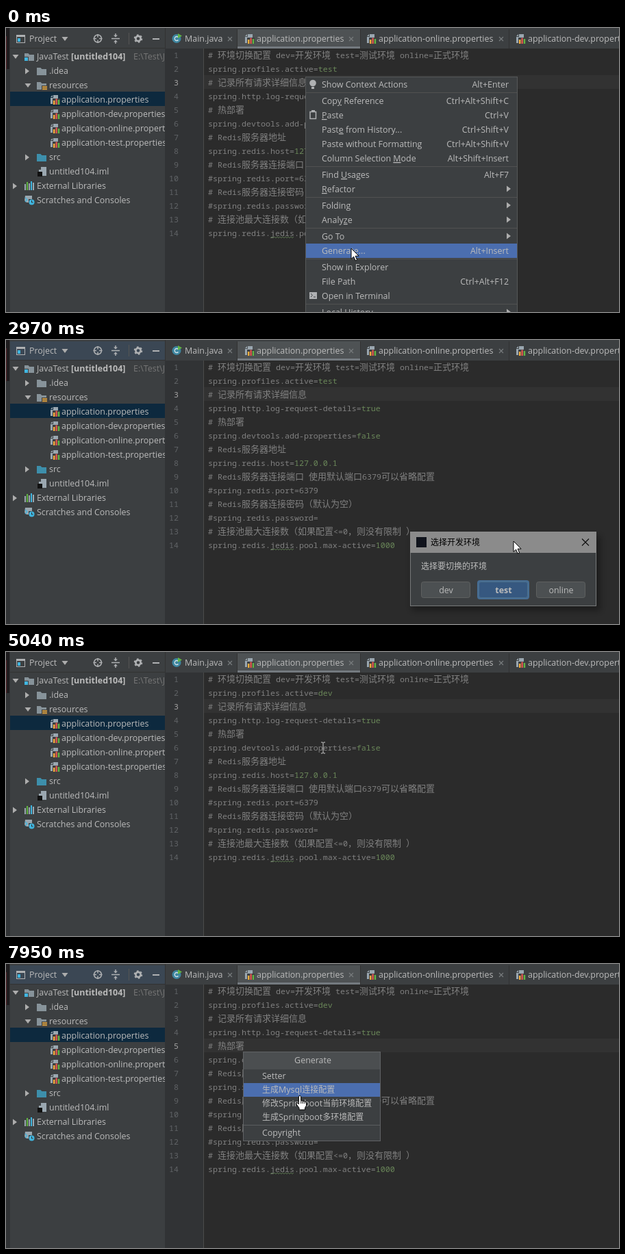
An HTML page that plays this animation: 895x415 px, repeating every 8 s.

```html
<!DOCTYPE html>
<html lang="zh">
<head>
<meta charset="utf-8">
<title>Switching environments</title>
<style>
html, body { margin: 0; width: 100%; height: 100%; overflow: hidden; background: #2b2b2b; }
svg { display: block; }
text { white-space: pre; fill: #bbb; font: 12.45px "Open Sans", "Noto Sans CJK SC", "Noto Sans CJK", sans-serif; }
text.mono { fill: #808080; font: 11.67px "Noto Sans Mono", "Noto Sans CJK SC", "Noto Sans CJK", monospace; }
.cjk { font-size: 12px; font-family: "Noto Sans CJK SC", "Noto Sans CJK", sans-serif; }
.mono .cjk { font-size: 13px; }
.val { fill: #6a8759; }
.mn { text-decoration: underline; }
.bold { font-weight: 700; }
</style>
</head>
<body>
<svg id="stage" width="895" height="415" viewBox="0 0 895 415">
  <defs>
    <clipPath id="sideClip"><rect x="6" width="226" height="415"/></clipPath>
    <filter id="blur" x="-10%" y="-20%" width="120%" height="150%"><feGaussianBlur stdDeviation="4"/></filter>
    <g id="props">
      <path d="M4 0h7v13h-11v-9h4z" fill="#9aa7b0"/>
      <path d="M3 0v3h-3z" fill="#9aa7b0"/>
      <path d="M3 5h11v9h-11z" fill="#3c3f41"/>
      <path d="M4 8h2.4v6h-2.4z" fill="#f4af3d"/>
      <path d="M7.4 5.5h2.4v8.5h-2.4z" fill="#e0574f"/>
      <path d="M10.8 7h2.4v7h-2.4z" fill="#62b543"/>
    </g>
    <path id="folder" d="M0 1h5.5l1.8 2h6.7v9h-14z"/>
    <path id="down" d="M-4.5 -3h9l-4.5 6z" fill="#adadad"/>
    <path id="right" d="M-3 -4.5v9l6 -4.5z" fill="#adadad"/>
    <path id="close" d="M-3 -3l6 6m0 -6l-6 6" stroke="#777b7d" stroke-width="1.2"/>
    <path id="arrow" d="M0 0v15.5l3.6 -3.4 2.5 5.9 2.5 -1.1 -2.5 -5.7h5z" fill="#fff" stroke="#000"/>
    <path id="hand" d="M-1.6 1.5q1.6 -2.4 3.2 0v6l6 1.3q1.9 .6 1.9 2.4v3.8l-1.9 3.2v2.8h-8.6v-2.6l-4 -5.6q-.8 -1.8 1 -2.1l2.4 2zM1.8 8v4M4.4 8.6v3.4M7 9.2v2.8" fill="#fff" stroke="#000"/>
    <path id="beam" d="M-3 -8h2.2l.8 .8 .8 -.8h2.2M0 -7.2v14.4M-3 8h2.2l.8 -.8 .8 .8h2.2" fill="none" stroke="#d0d0d0"/>
  </defs>
  <g id="side" clip-path="url(#sideClip)"></g>
  <g id="tabs"></g>
  <g id="editor"></g>
  <g id="overlay"></g>
  <use id="cursor"/>
</svg>
<script>
const $ = id => document.getElementById(id);
const esc = s => s.replace(/&/g, '&amp;').replace(/</g, '&lt;');
const runs = s => esc(s).replace(/[\u3000-\uffef]+/g, m => `<tspan class="cjk">${m}</tspan>`);
const mnemonic = s => s.replace(/_(.)/, '<tspan class="mn">$1</tspan>');
const raw = (x, y, html, attrs = '') => `<text x="${x}" y="${y}" ${attrs}>${html}</text>`;
const text = (x, y, s, attrs) => raw(x, y, runs(s), attrs);
const rect = (x, y, w, h, fill, attrs = '') =>
  `<rect x="${x}" y="${y}" width="${w}" height="${h}" fill="${fill}" ${attrs}/>`;
const box = (x, y, w, h, fill, line, attrs) =>
  rect(x + .5, y + .5, w - 1, h - 1, fill, `stroke="${line}" ${attrs || ''}`);
const use = (id, x, y, fill = '') => `<use href="#${id}" x="${x}" y="${y}" ${fill && `fill="${fill}"`}/>`;
const path = (d, stroke, width = 1) => `<path d="${d}" fill="none" stroke="${stroke}" stroke-width="${width}"/>`;

function header() {
  const icon = '#afb1b3';
  let out = rect(6, 2, 226, 27, '#3c3f41', 'id="header"') + rect(6, 29, 226, 1, '#323232');
  out += box(15, 10, 13, 12, 'none', icon) + rect(15, 10, 13, 3, icon) + rect(17, 15, 4, 5, '#40b6e0');
  out += text(34, 20, 'Project') + use('down', 86, 16);
  out += `<circle cx="134" cy="15.5" r="5.5" fill="none" stroke="${icon}" stroke-width="1.5"/>`;
  out += path('M134 9v4.5M134 17.5v4.5M127.5 15.5h4.5M136 15.5h4.5', icon, 1.5);
  out += path('M154 15.5h12', icon, 1.5) + path('M160 8v4M160 23v-4', icon, 1.5);
  out += `<path d="M157 10.5h6l-3 3zM157 20.5h6l-3 -3z" fill="${icon}"/>` + rect(179, 7, 1, 17, '#555');
  out += `<circle cx="193" cy="15.5" r="3.6" fill="none" stroke="${icon}" stroke-width="2.6"/>`;
  out += `<circle cx="193" cy="15.5" r="5.3" fill="none" stroke="${icon}" stroke-width="2" stroke-dasharray="2.6 2.95"/>`;
  return out + rect(214, 15, 10, 2, icon);
}

function tree() {
  const gray = '#87939a', blue = '#3d8fab';
  let out = use('down', 14, 41) + use('folder', 27, 35, gray) + rect(26, 41, 7, 7, '#3c3f41') + rect(27, 42, 5, 5, '#40b6e0');
  out += raw(45, 45, 'JavaTest <tspan class="bold">[untitled104]</tspan>') + text(186, 45, 'E:\\Test\\JavaTest', 'style="fill:#777"');
  out += use('right', 31, 62) + use('folder', 45, 56, gray) + text(63, 66, '.idea');
  out += use('down', 32, 83) + use('folder', 45, 77, gray) + rect(52, 83, 8, 7, '#3c3f41');
  out += [84, 86, 88].map(y => rect(53, y, 7, 1.2, '#f4af3d')).join('') + text(63, 87, 'resources');
  ['', '-dev', '-online', '-test'].forEach((env, i) => {
    out += use('props', 65, 97 + 21 * i) + text(81, 108 + 21 * i, `application${env}.properties`);
  });
  out += use('right', 31, 188) + use('folder', 45, 182, blue) + text(63, 192, 'src');
  out += '<path d="M51 202h8v13h-11v-9h3z" fill="#9aa7b0"/>' + rect(46, 209, 7, 7, '#111') + text(63, 213, 'untitled104.iml');
  out += use('right', 13, 230);
  [['#9aa7b0', 27, 5], ['#62b543', 30, 2], ['#9aa7b0', 33, 4], ['#40b6e0', 36, 1], ['#9aa7b0', 39, 3]].forEach(
    ([c, x, dy]) => { out += rect(x, 222 + dy, 2, 14 - dy, c); });
  out += text(45, 234, 'External Libraries');
  out += '<path d="M28 244h10v5h-5v5h-3l-3 -3z" fill="#9aa7b0"/>' + path('M28 247l3 3-3 3', '#40b6e0', 1.3);
  out += '<circle cx="37.5" cy="253.5" r="4" fill="#40b6e0"/>' + path('M37.5 251v3h2', '#333');
  return `<g transform="translate(0 1)">${out}${text(45, 255, 'Scratches and Consoles')}</g>`;
}

function drawSide() {
  $('side').innerHTML = rect(6, 0, 226, 415, '#3c3f41') + rect(6, 93, 226, 21, '#0d293e') + header() + tree();
}

function drawTabs() {
  let out = rect(0, 0, 6, 415, '#313335') + rect(0, 0, 5, 60, '#1e1c1e') + rect(0, 12, 1, 48, '#552429');
  out += rect(232, 0, 663, 30, '#3c3f41') + rect(337, 2, 180, 28, '#4e5254') + rect(337, 27, 180, 3, '#747a80');
  out += [337, 517, 734].map(x => rect(x, 2, 1, 28, '#323232')).join('') + rect(232, 0, 1, 30, '#323232');
  out += '<circle cx="249" cy="15.5" r="6.5" fill="#3e86a0"/>' + path('M251.5 13.5a3 3 0 1 0 0 4', '#d5e4ea', 1.3);
  out += '<path d="M251 8l6 3.5-6 3.5z" fill="#62b543"/>' + text(261, 20, 'Main.java') + use('close', 327, 16);
  [['', 366, 504], ['-online', 544, 723], ['-dev', 762, 0]].forEach(([env, x, end]) => {
    out += use('props', x - 17, 9) + text(x, 20, `application${env}.properties`);
    if (end) out += use('close', end, 16);
  });
  $('tabs').innerHTML = out;
}

const lines = env => [
  '# 环境切换配置 dev=开发环境 test=测试环境 online=正式环境',
  'spring.profiles.active=' + env,
  '# 记录所有请求详细信息',
  'spring.http.log-request-details=true',
  '# 热部署',
  'spring.devtools.add-properties=false',
  '# Redis服务器地址',
  'spring.redis.host=127.0.0.1',
  '# Redis服务器连接端口 使用默认端口6379可以省略配置',
  '#spring.redis.port=6379',
  '# Redis服务器连接密码（默认为空）',
  '#spring.redis.password=',
  '# 连接池最大连接数（如果配置<=0，则没有限制 ）',
  'spring.redis.jedis.pool.max-active=1000'
];

function editor(env, row) {
  let out = rect(232, 30, 663, 385, '#2b2b2b') + rect(232, 30, 57, 385, '#313335');
  out += rect(289, 9 + 20 * row, 606, 20, '#323232') + rect(288, 30, 1, 385, '#4b4b4b');
  lines(env).forEach((line, i) => {
    const y = 44 + 20 * i, [key, val] = line.split('=');
    out += raw(252, y, i + 1, `class="mono" text-anchor="end" style="fill:${i + 1 === row ? '#a4a3a3' : '#606366'}"`);
    out += raw(295, y, line[0] === '#' ? runs(line) : `${key}=<tspan class="val">${val}</tspan>`, 'class="mono"');
  });
  let wave = 'M386 307';
  for (let i = 0; i < 17; i++) wave += `l2 ${i % 2 ? 2 : -2}`;
  return out + path(wave, '#5d7a52', .9);
}

// label, shortcut ('>' opens a submenu), centre of the row
const items = [
  ['Show Context Actions', 'Alt+Enter', 11], ['Cop_y Reference', 'Ctrl+Alt+Shift+C', 35],
  ['_Paste', 'Ctrl+V', 56], ['Past_e from History...', 'Ctrl+Shift+V', 77],
  ['Paste without Formatting', 'Ctrl+Alt+Shift+V', 98], ['Column Selection _Mode', 'Alt+Shift+Insert', 119],
  ['Find _Usages', 'Alt+F7', 143], ['_Refactor', '>', 164], ['Folding', '>', 188], ['Analy_ze', '>', 209],
  ['Go To', '>', 233], ['Generate...', 'Alt+Insert', 254], ['Show in Explorer', '', 278],
  ['File Path', 'Ctrl+Alt+F12', 299], ['Open in Terminal', '', 320], ['Local _History', '>', 344]
];
const analyze = ['Inspect Code...', 'Code Cleanup...', 'Run Inspection by Name...', 'Configure Current File...', 'View Offline Results...'];

function menu(x, y, hover, sub) {
  let out = box(x, y, 310, 400, '#3c3f41', '#565859');
  if (hover >= 0) out += rect(x + 1, y + items[hover][2] - 10, 308, 21, '#4b6eaf');
  out += [23, 131, 176, 221, 266, 332].map(d => rect(x + 1, y + d, 308, 1, '#515151')).join('');
  items.forEach(([label, key, dy]) => {
    out += raw(x + 24, y + dy + 5, mnemonic(label));
    out += key === '>' ? use('right', x + 297, y + dy) : text(x + 297, y + dy + 5, key, 'text-anchor="end"');
  });
  out += `<circle cx="${x + 11}" cy="${y + 9.5}" r="4.8" fill="#afb1b3"/>` + rect(x + 9, y + 15, 4, 3, '#afb1b3');
  out += path(`M${x + 7} ${y + 51.5}h8.5v10h-8.5z`, '#afb1b3', 1.5) + rect(x + 9, y + 49, 5, 3, '#afb1b3');
  out += rect(x + 6, y + 315, 11, 10, '#afb1b3') + path(`M${x + 8} ${y + 317}l2.5 2.5-2.5 2.5m4 0h3`, '#3c3f41');
  if (sub) {
    out += box(765, 309, 320, 150, '#3c3f41', '#565859');
    analyze.forEach((label, i) => { out += text(789, 325 + 21 * i, label); });
  }
  return out;
}

const actions = ['Setter', '生成Mysql连接配置', '修改Springboot当前环境配置', '生成Springboot多环境配置', 'Copyright'];

function popup(x, y, hover) {
  const top = i => y + 26 + 20 * i + (i === 4 ? 3 : 0);
  let out = box(x, y, 201, 131, '#3c3f41', '#616365') + rect(x + 1, y + 1, 199, 25, '#4b4e50');
  out += text(x + 102, y + 17, 'Generate', 'text-anchor="middle"');
  out += rect(x + 1, top(hover), 199, 20, '#4b6eaf') + rect(x + 1, y + 107, 199, 1, '#5b5d5f');
  actions.forEach((label, i) => { out += text(x + 28, top(i) + 14, label); });
  return out;
}

function dialog(x, y, focus) {
  let out = rect(x + 2, y + 6, 276, 110, '#000', 'rx="4" opacity=".3" filter="url(#blur)"');
  out += box(x, y, 272, 109, '#3c3f41', '#77797a') + rect(x, y, 272, 31, '#8b8b8b');
  out += rect(x + 9, y + 8, 15, 15, '#10131c') + text(x + 30, y + 20, '选择开发环境', 'style="fill:#000"');
  out += path(`M${x + 251} ${y + 10.5}l10 10m0 -10l-10 10`, '#111', 1.2) + text(x + 16, y + 55, '选择要切换的环境');
  ['dev', 'test', 'online'].forEach((label, i) => {
    const bx = x + 16 + 84 * i, on = i === focus;
    if (on) out += rect(bx - 2, y + 71, 76, 28, '#466d94', 'rx="4"');
    out += box(bx, y + 73, 72, 24, on ? '#365880' : '#4c5052', on ? '#4c708c' : '#5e6060', 'rx="3"');
    out += text(bx + 36.5, y + 90, label, `text-anchor="middle" ${on ? 'class="bold"' : ''}`);
  });
  return out;
}

const none = () => '';
const menuA = () => menu(437, 71, 11);
const menuB = (hover, sub) => () => menu(459, 113, hover, sub);
const popA = hover => () => popup(437, 88, hover);
const popB = hover => () => popup(346, 128, hover);
const dlg = (x, y, focus = 1) => () => dialog(x, y, focus);
const drag = (t, x, y) => [t, 'arrow', x + 151, y + 14, dlg(x, y)];

// start time, cursor, x, y, overlay
const steps = [
  [0, 'arrow', 504, 322, menuA], [530, 'beam', 506, 318, none], [650, 'arrow', 507, 306, popA(0)],
  [780, 'arrow', 507, 292, popA(0)], [930, 'hand', 505, 200, popA(4)], [1050, 'hand', 503, 177, popA(3)],
  [1480, 'hand', 503, 174, popA(3)], [1600, 'hand', 503, 167, popA(2)], [1720, 'hand', 503, 160, popA(2)],
  [2000, 'arrow', 503, 161, dlg(660, 335)], [2150, 'arrow', 505, 195, dlg(660, 335)],
  [2300, 'arrow', 660, 275, dlg(660, 335)], drag(2420, 660, 335), drag(2970, 590, 280), drag(3090, 470, 190),
  drag(3220, 397, 136), drag(3360, 387, 123), drag(3610, 392, 128), drag(3730, 405, 143), drag(3850, 415, 153),
  [4000, 'arrow', 542, 192, dlg(415, 153)], [4120, 'arrow', 495, 231, dlg(415, 153)],
  [4240, 'arrow', 483, 234, dlg(415, 153)], [4360, 'arrow', 476, 236, dlg(415, 153)],
  [4500, 'arrow', 476, 236, dlg(415, 153, 0)], [4660, 'beam', 476, 236, none], [4920, 'beam', 472, 200, none],
  [5040, 'beam', 463, 140, none], [5160, 'beam', 459, 113, none], [5280, 'arrow', 459, 113, menuB(-1)],
  [5400, 'arrow', 476, 170, menuB(2)], [5520, 'arrow', 500, 232, menuB(5)], [5640, 'arrow', 511, 279, menuB(7)],
  [5760, 'arrow', 512, 300, menuB(8)], [5880, 'arrow', 511, 315, menuB(9)], [6160, 'arrow', 511, 315, menuB(9, true)],
  [6590, 'arrow', 510, 345, menuB(10, true)], [6710, 'arrow', 509, 358, menuB(10)], [6860, 'arrow', 509, 367, menuB(11)],
  [7020, 'beam', 511, 365, none], [7140, 'arrow', 517, 350, popB(0)], [7260, 'arrow', 525, 332, popB(0)],
  [7400, 'arrow', 525, 267, popB(0)], [7560, 'hand', 470, 222, popB(3)], [7680, 'hand', 433, 208, popB(2)],
  [7830, 'hand', 430, 201, popB(2)], [7950, 'hand', 429, 192, popB(1)]
];

let shown, page;
function draw(now) {
  const t = now % 8000, step = steps.findLast(s => s[0] <= t);
  const env = t < 4660 ? 'test' : 'dev', row = t < 5160 ? 3 : 5;
  if (page !== env + row) {
    page = env + row;
    $('editor').innerHTML = editor(env, row);
  }
  if (shown !== step) {
    shown = step;
    const [, shape, x, y, overlay] = step, cursor = $('cursor');
    $('overlay').innerHTML = overlay();
    cursor.setAttribute('href', '#' + shape);
    cursor.setAttribute('x', x);
    cursor.setAttribute('y', y);
    // the tool window is tinted while a popup or dialog is open
    const tinted = t >= 650 && t < 4660 || t >= 7140;
    $('header').setAttribute('fill', tinted ? '#3b4754' : '#3c3f41');
  }
}

drawSide();
drawTabs();
const start = performance.now();
function tick() {
  draw(performance.now() - start);
  requestAnimationFrame(tick);
}
tick();
</script>
</body>
</html>
```
